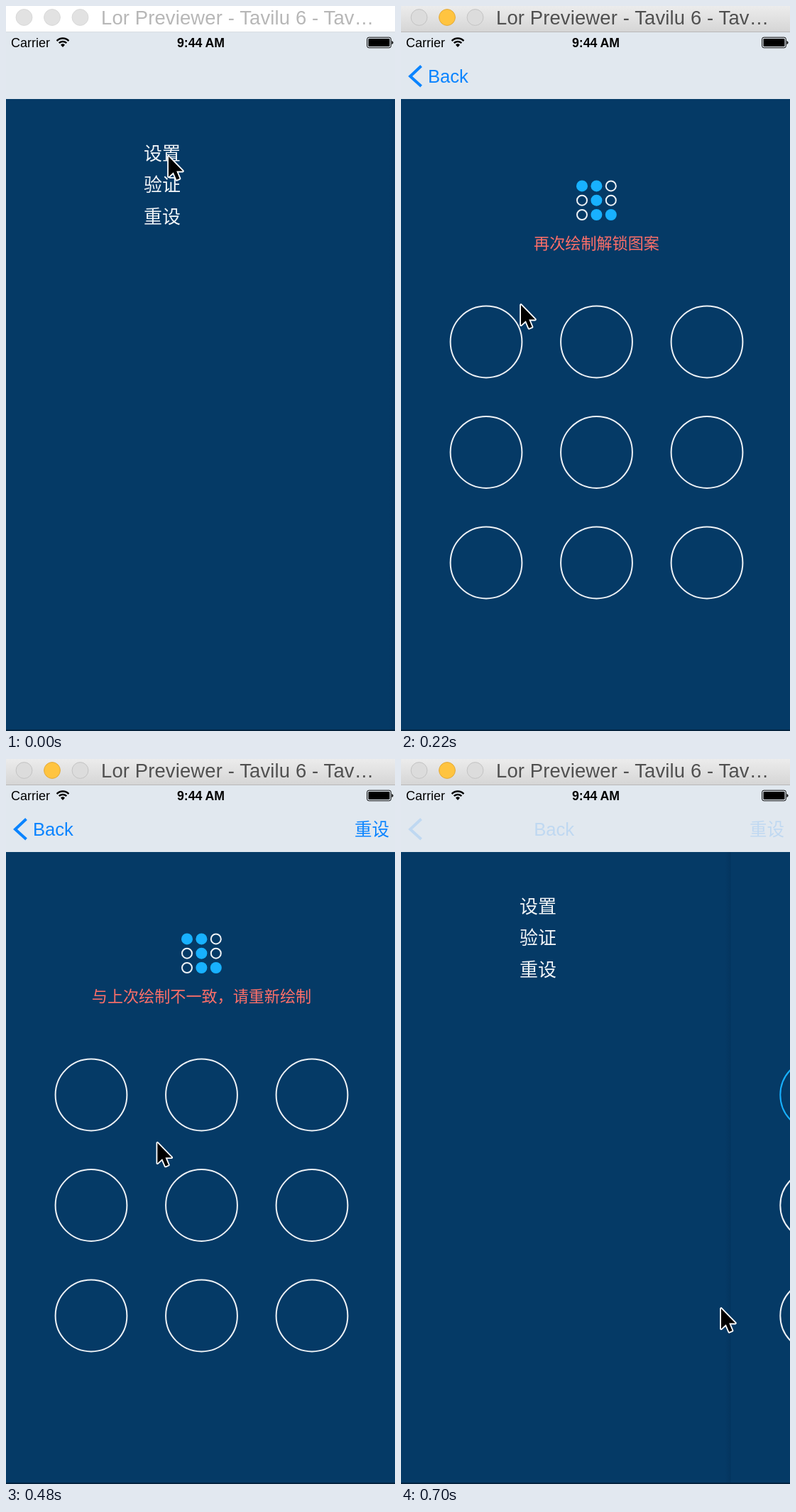
Write an HTML page that moves like this. It is 548 px wide and 1021 px high and loops after 0.72 s.

```html
<!DOCTYPE html>
<html lang="zh-CN">
<head>
<meta charset="utf-8">
<title>Pattern lock</title>
<style>
  html, body { margin: 0; width: 100%; height: 100%; overflow: hidden; background: #053a66; }
  svg { display: block; width: 548px; height: 1021px; }
  text { font-family: "Liberation Sans", Arial, sans-serif; }
  .cjk { font-family: "Noto Sans CJK SC", "Noto Sans CJK", sans-serif; }
  #menu text { font-size: 26px; font-weight: 300; fill: #f2f5f8; }
  #hint { font-size: 22.1px; font-weight: 300; text-anchor: middle; }
  #nav { fill: #0a84ff; }
</style>
</head>
<body>
<svg viewBox="0 0 548 1021">
  <defs>
    <linearGradient id="bar" x2="0" y2="1">
      <stop stop-color="#ececec"/><stop offset="1" stop-color="#d5d5d5"/>
    </linearGradient>
    <linearGradient id="edge">
      <stop stop-color="#022a50" stop-opacity="0"/><stop offset="1" stop-color="#022a50" stop-opacity=".35"/>
    </linearGradient>
  </defs>

  <rect width="548" height="1021" fill="#053a66"/>
  <g id="menu" class="cjk">
    <text class="cjk" x="194" y="217">设置</text>
    <text class="cjk" x="194" y="261">验证</text>
    <text class="cjk" x="194" y="306">重设</text>
  </g>

  <g id="lock">
    <rect x="-8" y="131" width="8" height="888" fill="url(#edge)"/>
    <rect y="131" width="548" height="890" fill="#053a66"/>
    <g id="mini"></g>
    <text id="hint" class="cjk" y="341.5"></text>
    <g id="pad"></g>
  </g>
  <rect y="1019" width="548" height="2" fill="#03233f"/>

  <rect y="37" width="548" height="94" fill="#e1e8ef"/>
  <text x="7" y="58" font-size="18">Carrier</text>
  <g fill="none" stroke="#000" stroke-width="2.5">
    <path d="M71.6 49.1A11.8 11.8 0 0 1 88.4 49.1"/>
    <path d="M74.7 52.2A7.5 7.5 0 0 1 85.3 52.2"/>
  </g>
  <path d="M80 58L77 54.8A4.3 4.3 0 0 1 83 54.8Z"/>
  <text x="274.5" y="58" font-size="17.7" font-weight="700" text-anchor="middle">9:44 AM</text>
  <rect x="508.7" y="44.2" width="33.6" height="14.6" rx="2.5" fill="none" stroke="#000"/>
  <rect x="510.5" y="46" width="30" height="11" rx="1"/>
  <path d="M543.5 49q2 .5 2 2.5t-2 2.5z"/>

  <g id="nav">
    <path d="M28.5 84.5L13 99L28.5 113" fill="none" stroke="#0a84ff" stroke-width="4"/>
    <text id="back" y="108" font-size="25.6">Back</text>
    <text id="reset" class="cjk" x="491" y="108.3" font-size="24.5">重设</text>
  </g>

  <rect id="titleBar" width="548" height="37"/>
  <rect id="rule" y="36" width="548" height="1"/>
  <g id="lights"></g>
  <text id="title" x="134" y="25.5" font-size="27.4" letter-spacing=".15">Lor Previewer - Tavilu 6 - Tav…</text>

  <path id="cursor" d="M0 0V28.5L6.8 22.3L11.3 32.8L15.6 31L11.2 20.6H20Z"
        fill="#000" stroke="#fff" stroke-width="3.6" paint-order="stroke" stroke-linejoin="round"/>
</svg>
<script>
const STEP = 20, LOOP = 720;
const BLUE = '#18b1ff', RED = '#ff6f69', WHITE = '#eef2f6';
const $ = id => document.getElementById(id);
const HINTS = ['绘制解锁图案', '再次绘制解锁图案', '与上次绘制不一致，请重新绘制'];

// [step, nodes joined in order, rejected]
const PATHS = [
  [0, ''], [4, '0'], [5, '01'], [6, '014'], [7, '0147'], [8, '01478'], [10, ''],
  [12, '0'], [13, '01'], [14, '014'], [15, '0145', true],
  [17, '2'], [18, '25'], [19, '25436'], [20, '25436', true], [22, ''],
  [26, '1'], [27, '1', true],
  [29, '0'], [30, '01'], [31, '014'], [32, '0147'], [33, '01478']
];
// [step, x, y] of the pointer tip
const POINTER = [
  [0, 228, 210], [1, 229, 212], [3, 105, 440], [4, 125, 448], [5, 237, 444],
  [6, 270, 605], [7, 272, 755], [8, 420, 772], [9, 428, 774], [11, 168, 419],
  [12, 125, 448], [13, 240, 450], [14, 272, 598], [15, 460, 606], [16, 466, 590],
  [17, 425, 448], [18, 425, 605], [19, 114, 762], [20, 113, 696], [26, 262, 460],
  [27, 245, 466], [28, 109, 488], [29, 116, 466], [30, 252, 460], [31, 270, 602],
  [32, 274, 752], [33, 418, 772], [34, 444, 774], [35, 450, 772]
];
// [step, share of the lock screen pushed off to the right]
const SLIDE = [[0, 1], [1, .55], [2, .1], [3, 0], [33, 0], [34, .42], [35, .848]];
const SHAKE = { 15: -3, 16: 3, 20: -5, 21: 4, 27: -4, 28: .5 };

const held = (table, n) => table.filter(row => row[0] <= n).pop();

function blend(table, n, col) {
  const a = held(table, n), b = table.find(row => row[0] > n) || a;
  return a === b ? a[col] : a[col] + (b[col] - a[col]) * (n - a[0]) / (b[0] - a[0]);
}

const circle = (x, y, r, fill, stroke = 'none') =>
  `<circle cx="${x}" cy="${y}" r="${r}" fill="${fill}" stroke="${stroke}" stroke-width="2"/>`;
const spot = i => [120 + i % 3 * 155.5, 473 + Math.floor(i / 3) * 155.5];

function drawPad(path, color) {
  let out = '';
  for (let i = 0; i < 9; i++) {
    const [x, y] = spot(i), at = path.indexOf(i), on = at >= 0;
    out += circle(x, y, 50.4, 'none', on ? color : WHITE);
    if (!on) continue;
    out += circle(x, y, 20.7, color);
    if (at === path.length - 1) continue;
    const [nx, ny] = spot(+path[at + 1]);
    const dist = Math.hypot(nx - x, ny - y);
    const turn = Math.atan2(ny - y, nx - x) * 180 / Math.PI;
    out += `<g transform="translate(${x} ${y}) rotate(${turn})">
      <path d="M31 -10.5L41 0L31 10.5Z" fill="${color}"/>
      <path d="M51 0H${dist - 51}" stroke="${color}" stroke-width="2"/></g>`;
  }
  return out;
}

function drawMini(path) {
  let out = '';
  for (let i = 0; i < 9; i++) {
    const x = 255 + i % 3 * 20.4, y = 253.4 + Math.floor(i / 3) * 20.3;
    out += path.includes(i) ? circle(x, y, 8, BLUE) : circle(x, y, 7, 'none', WHITE);
  }
  return out;
}

function drawWindow(active) {
  $('titleBar').setAttribute('fill', active ? 'url(#bar)' : '#fff');
  $('rule').setAttribute('fill', active ? '#b8b8b8' : '#d9dde2');
  $('title').setAttribute('fill', active ? '#505050' : '#b7b7b7');
  const gray = active ? ['#dcdcdc', '#c3c3c3'] : ['#e2e2e2', '#d8d8d8'];
  $('lights').innerHTML = [25.5, 65, 104.5].map((x, i) =>
    `<circle cx="${x}" cy="16" r="11.4" fill="${active && i === 1 ? '#ffc440' : gray[0]}"
      stroke="${active && i === 1 ? '#e2a93a' : gray[1]}"/>`).join('');
}

function draw(n) {
  const [, path, bad] = held(PATHS, n);
  const slide = blend(SLIDE, n, 1);
  const stage = n < 10 ? 0 : n < 15 ? 1 : 2;

  drawWindow(n > 0);
  $('menu').setAttribute('transform', `translate(${-177 * (1 - slide)})`);
  $('lock').setAttribute('transform', `translate(${548 * slide})`);
  $('nav').setAttribute('opacity', 1 - slide);
  $('back').setAttribute('x', 38 + 176 * slide);
  $('reset').setAttribute('visibility', stage === 2 ? 'visible' : 'hidden');

  $('hint').textContent = HINTS[stage];
  $('hint').setAttribute('fill', stage ? RED : WHITE);
  $('hint').setAttribute('x', 275.5 + (SHAKE[n] || 0));
  $('mini').innerHTML = drawMini(stage ? '01478' : '');
  $('pad').innerHTML = drawPad(path, bad ? RED : BLUE);
  $('cursor').setAttribute('transform',
    `translate(${blend(POINTER, n, 1) + 1} ${blend(POINTER, n, 2) + 2})`);
}

const start = performance.now();
let shown = -1;
function tick() {
  const n = Math.floor((performance.now() - start) % LOOP / STEP);
  if (n !== shown) draw(shown = n);
  requestAnimationFrame(tick);
}
tick();
</script>
</body>
</html>
```
